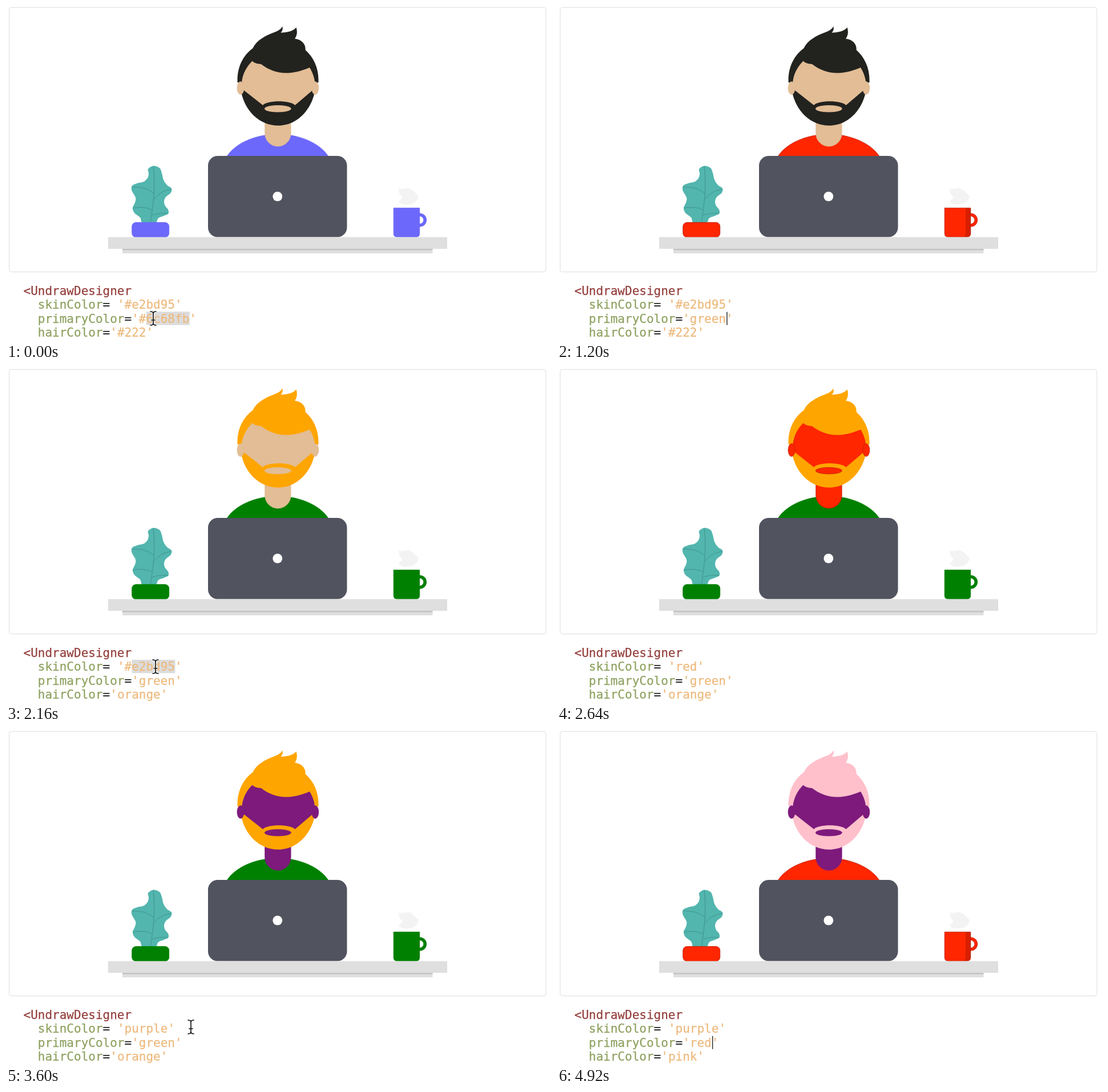
Recreate the animation shown at these times as an HTML page. Size 955x586 px, loop 5.04 s.

```html
<!DOCTYPE html>
<html lang="en">
<head>
<meta charset="utf-8">
<title>Designer props</title>
<style>
  html, body { margin: 0; width: 100%; height: 100%; overflow: hidden; background: #fff; }
  svg { display: block; width: 100vw; height: 100vh; }
  text { font: 21px "DejaVu Sans Mono", "Liberation Mono", monospace; white-space: pre; stroke-width: .25px; }
  .tag { fill: #943f3c; stroke: #943f3c; }
  .attr { fill: #8ea15f; stroke: #8ea15f; }
  .eq { fill: #2b2b2b; stroke: #2b2b2b; }
  .str { fill: #edb97c; stroke: #edb97c; }
  .skin { fill: var(--skin); stroke: var(--skin-edge); stroke-width: .8px; }
  .hair { fill: var(--hair); }
  .primary { fill: var(--primary); stroke: var(--primary-edge); stroke-width: .8px; }
  .vein { fill: none; stroke: #3f958f; stroke-width: 1px; }
</style>
</head>
<body>
<svg id="stage" viewBox="0 0 955 586">
  <rect width="955" height="586" fill="#fff"/>
  <rect x="5.5" y="2.5" width="940.5" height="464" rx="4" fill="none" stroke="#dedede"/>

  <!-- person -->
  <path class="primary" d="M387 264C400 243 434 225 476 225S552 243 565 264Z"/>
  <path class="skin" d="M453.7 195V223.5A22.7 22.7 0 0 0 499.1 223.5V195Z"/>
  <path class="skin" d="M413 134C416 117 422 105 431 95H532C538 108 541 122 541.5 150L506 185H448L413 150Z"/>
  <path class="hair" d="M405.6 134C404.5 108 415 87 432.5 74C439 60 455 52 468 47
    C477 44 483 40 484 35.5C486 40 484 44 481.5 47C492 46 503 45 508.5 37.5
    C511 45 510 52 506 57.5C517 58 526 67 524.5 77C539 90 548.5 109 547.5 134L541.5 136
    C540.5 125 537 116 532 108C520 113 506 117.5 490 117.5C475 117.5 460 112 447 102
    C442 101.5 436 101 431.5 96.5C422 106 414 119 413 136Z"/>
  <path class="hair" d="M411.5 148H417L450 174C458 165 498 165 506.5 174L537 148H541.5
    C535 185 508 209.7 476.5 209.7S418 185 411.5 148Z"/>
  <ellipse class="skin" cx="476.3" cy="180.2" rx="23" ry="5.7"/>
  <ellipse class="skin" cx="411" cy="144" rx="6" ry="11.3"/>
  <ellipse class="skin" cx="541.8" cy="144" rx="6" ry="11.3"/>

  <!-- desk -->
  <rect x="354" y="263" width="243.5" height="142.5" rx="17" fill="#51535f"/>
  <circle cx="475.8" cy="334.2" r="8.4" fill="#fff"/>
  <path id="leaf" fill="#52b5ae"/>
  <path class="vein" d="M258 281C261 306 260 332 256 360L253 381M221 317.500C238 317 250 321 259 329
    M289.500 322C278 323 268 328 259 339M222 354.500C235 352 247 353 256.500 358M284 364C275 363 265 364 255.500 367"/>
  <rect class="primary" x="220.700" y="379.700" width="65" height="26" rx="7"/>
  <path fill="#f3f3f3" d="M687 320C693 323 699 319 706 320C714 322 717 329 723 333
    C722 341 716 348 706 348C698 350 690 347 688 343C692 339 696 337 693 333C687 329 690 324 687 320Z"/>
  <circle cx="725" cy="375.500" r="9.300" fill="none" stroke="var(--primary-edge)" stroke-width="5.600"/>
  <circle cx="725" cy="375.500" r="9.300" fill="none" stroke="var(--primary)" stroke-width="4.400"/>
  <path class="primary" d="M679.200 354.300H724.800V399Q724.800 405.300 718.500 405.300H685.500Q679.200 405.300 679.200 399Z"/>
  <path id="shade" fill="#000" opacity=".16" d="M716 355H724.800V399Q724.800 404 718 405H713Q716 402 716 398Z"/>
  <rect x="179" y="405.500" width="594" height="20.500" fill="#dfdfdf"/>
  <rect x="204" y="426" width="543.500" height="8" fill="#dfdfdf"/>
  <rect x="204" y="426" width="543.500" height="2.500" fill="#c3c3c3"/>

  <!-- code -->
  <rect id="sel" height="23.500" fill="#dcdcdc"/>
  <text class="tag" x="30.500" y="507">&lt;UndrawDesigner</text>
  <g id="props"></g>
  <rect id="caret" width="1.400" height="23" fill="#222"/>
  <g id="beam" fill="none" stroke-linecap="round">
    <path d="M-5-12Q0-12 0-8.500Q0-12 5-12M0-8.500V8.500M-5 12Q0 12 0 8.500Q0 12 5 12M-3 3H3" stroke="#fff" stroke-width="3.600"/>
    <path d="M-5-12Q0-12 0-8.500Q0-12 5-12M0-8.500V8.500M-5 12Q0 12 0 8.500Q0 12 5 12M-3 3H3" stroke="#111" stroke-width="1.700"/>
  </g>
</svg>
<script>
const STEP = 120, LOOP = 5040;
const LEFT = 30.5, CHAR = 12.642;
const $ = id => document.getElementById(id);
const paint = {
  red: '#ff2600', blue: '#0433ff', green: '#008000', orange: '#ffa500',
  purple: '#7d1a7c', pink: '#ffc0cb', '#222': '#22221f'
};
const edges = { red: '#b8200a' };

// col: column of the first character inside the quotes
const rows = {
  skin: { label: 'skinColor', gap: '= ', col: 14, y: 531.4 },
  primary: { label: 'primaryColor', gap: '=', col: 16, y: 555.8 },
  hair: { label: 'hairColor', gap: '=', col: 13, y: 580.2 }
};

const start = {
  text: { skin: '#e2bd95', primary: '#6c68fb', hair: '#222' },
  fill: { skin: '#e2bd95', primary: '#6c68fb', hair: '#222' },
  sel: null, caret: null, beam: null
};
const type = (row, value) => ({ text: { [row]: value }, caret: row, sel: null, beam: null });
const apply = (row, color) => ({ fill: { [row]: color } });
const pick = (row, x, y) => ({ sel: row, caret: null, beam: [x, y] });
const point = (x, y) => ({ caret: null, beam: [x, y] });

// step index -> change of state
const script = [
  [0, pick('primary', 258, 548)],
  [1, type('primary', '#')],
  [2, type('primary', 'b')],
  [3, type('primary', 'blue')],
  [4, apply('primary', 'blue')],
  [5, type('primary', 're')],
  [6, type('primary', 'red')],
  [7, apply('primary', 'red')],
  [9, type('primary', 'g')],
  [10, type('primary', 'green')],
  [11, apply('primary', 'green')],
  [12, pick('hair', 236, 572)],
  [13, type('hair', 'or')],
  [14, type('hair', 'orang')],
  [15, type('hair', 'orange')],
  [16, apply('hair', 'orange')],
  [17, point(262, 540)],
  [18, pick('skin', 262, 524)],
  [19, type('skin', 'r')],
  [20, type('skin', 'red')],
  [21, apply('skin', 'red')],
  [22, { caret: null }],
  [23, { caret: 'skin' }],
  [24, pick('skin', 222, 524)],
  [25, type('skin', 'p')],
  [26, type('skin', 'pur')],
  [27, type('skin', 'purple')],
  [28, apply('skin', 'purple')],
  [29, point(324, 521)],
  [31, point(270, 558)],
  [32, pick('hair', 236, 572)],
  [33, type('hair', 'p')],
  [34, type('hair', 'pink')],
  [35, apply('hair', 'pink')],
  [36, pick('primary', 264, 547)],
  [37, point(275, 523)],
  [38, type('primary', 'r')],
  [39, type('primary', 're')],
  [40, type('primary', 'red')],
  [41, apply('primary', 'red')]
];

function stateAt(step) {
  return script.filter(([at]) => at <= step).reduce((s, [, change]) => ({
    ...s, ...change,
    text: { ...s.text, ...change.text },
    fill: { ...s.fill, ...change.fill }
  }), start);
}

function smooth(points) {
  const n = points.length, at = i => points[(i + n) % n];
  let d = 'M' + points[0];
  points.forEach((p, i) => {
    const q = at(i + 1), before = at(i - 1), after = at(i + 2);
    const c1 = p.map((v, k) => v + (q[k] - before[k]) / 6);
    const c2 = q.map((v, k) => v - (after[k] - p[k]) / 6);
    d += `C${c1} ${c2} ${q}`;
  });
  return d + 'Z';
}

$('leaf').setAttribute('d', smooth([
  [258, 280.5], [269, 284], [273, 293], [276, 305], [282, 314], [290, 320], [288.500, 328],
  [280, 335], [277, 343], [279, 351], [284, 357], [284.500, 364], [277, 368], [267, 372],
  [261, 381], [240, 381], [235, 371], [225, 363], [222, 354], [226, 345], [227, 336],
  [220.500, 324], [221, 315.500], [230, 311], [241, 308.500], [248, 302], [250, 294], [249, 286]
]));

function span(text, cls) {
  const el = document.createElementNS('http://www.w3.org/2000/svg', 'tspan');
  el.setAttribute('class', cls);
  el.textContent = text;
  return el;
}

for (const row of Object.values(rows)) {
  const line = document.createElementNS('http://www.w3.org/2000/svg', 'text');
  line.setAttribute('x', LEFT + 2 * CHAR);
  line.setAttribute('y', row.y);
  row.value = span('', 'str');
  line.append(span(row.label, 'attr'), span(row.gap, 'eq'), row.value);
  $('props').append(line);
}

function place(el, attrs) {
  el.style.display = attrs ? '' : 'none';
  for (const name in attrs) el.setAttribute(name, attrs[name]);
}

function draw(time) {
  const s = stateAt(Math.floor((time % LOOP) / STEP));
  const root = $('stage').style;
  for (const name in rows) {
    const color = paint[s.fill[name]] || s.fill[name];
    rows[name].value.textContent = `'${s.text[name]}'`;
    root.setProperty('--' + name, color);
    root.setProperty(`--${name}-edge`, edges[s.fill[name]] || color);
  }
  place($('shade'), s.fill.primary === 'red' && {});

  const selRow = rows[s.sel], caretRow = rows[s.caret];
  const picked = selRow && s.text[s.sel];
  const skip = picked && picked[0] === '#' ? 1 : 0;
  place($('sel'), selRow && {
    x: LEFT + (selRow.col + skip) * CHAR + .5,
    y: selRow.y - 19.500,
    width: (picked.length - skip) * CHAR
  });
  place($('caret'), caretRow && {
    x: LEFT + (caretRow.col + s.text[s.caret].length) * CHAR + 1.200,
    y: caretRow.y - 19
  });
  place($('beam'), s.beam && { transform: `translate(${s.beam})` });
}

const begin = performance.now();
function tick() {
  draw(performance.now() - begin);
  requestAnimationFrame(tick);
}
tick();
</script>
</body>
</html>
```
